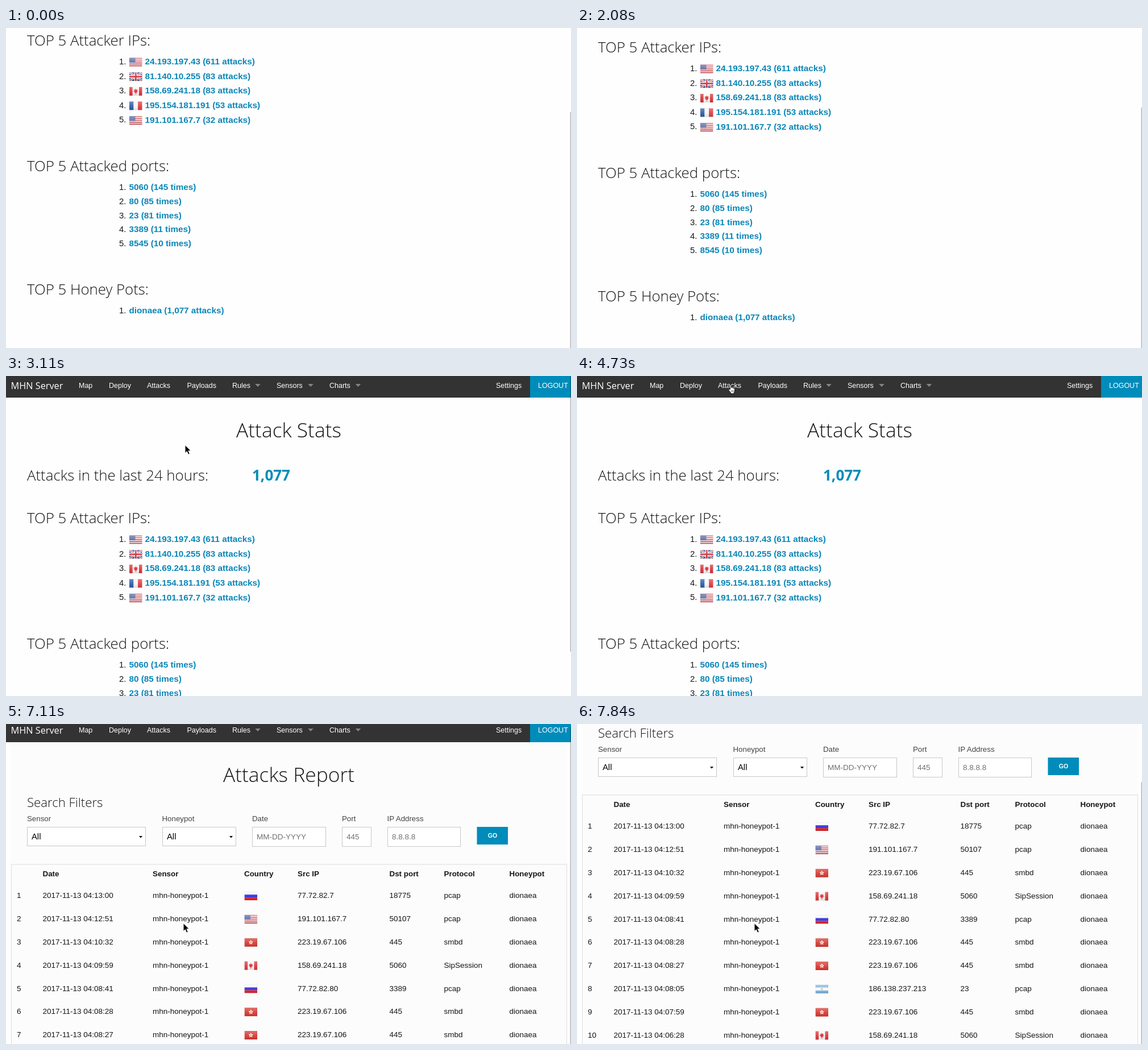
These frames come from a looping animation (994x563 px, 7.99 s). An HTML page:

```html
<!DOCTYPE html>
<html lang="en">
<head>
<meta charset="utf-8">
<title>Attack dashboard</title>
<style>
  html, body { margin: 0; width: 100%; height: 100%; overflow: hidden; background: #fefefe; }
  svg { display: block; }
  #stage { width: 994px; height: 563px; }
  text { font-family: "Liberation Sans", Arial, sans-serif; fill: #161616; white-space: pre; }
  .head { font-family: "Open Sans", sans-serif; font-weight: 300; }
  .brand { font-family: "Open Sans", sans-serif; fill: #fff; }
  .total { font-family: "Open Sans", sans-serif; font-weight: 700; fill: #008cba; }
  .link { font-weight: 700; fill: #0a86b8; }
  .bold { font-weight: 700; }
  .nav { fill: #fff; }
  .label { fill: #444; }
  .hint { fill: #707070; }
  .value { fill: #000; }
  .field { fill: #fff; stroke: #c8c8c8; }
</style>
</head>
<body>
<svg id="stage" viewBox="0 0 994 563">
  <defs>
    <linearGradient id="gloss" x2="0" y2="1">
      <stop offset="0" stop-color="#fff" stop-opacity=".3"/>
      <stop offset=".55" stop-color="#fff" stop-opacity=".08"/>
      <stop offset="1" stop-color="#000" stop-opacity=".1"/>
    </linearGradient>
  </defs>
  <g id="stats"></g>
  <g id="report"></g>
  <rect id="thumb" x="992.6" width="1.4" fill="#000" fill-opacity=".3"/>
  <g id="arrow">
    <path d="M0 0V14.2L3.3 11.2L5.7 16.7L8.3 15.6L5.9 10.2H10.3Z" fill="#000" stroke="#fff" stroke-width="1" stroke-linejoin="round"/>
  </g>
  <g id="hand">
    <path d="M3.2 9V1.6Q3.3 .4 4.3 .5Q5.3 .5 5.4 1.7V5.5Q6.6 4.6 7.5 5.9Q8.8 5.2 9.6 6.5Q11.4 6.1 11.5 8V11Q11.4 13 10.2 14.2V16H4.4V14.4L.8 10Q.1 8.6 1.1 8.2Q2.2 7.8 3.2 9Z" fill="#fff" stroke="#111" stroke-width="1" stroke-linejoin="round"/>
    <path d="M5.7 10V13M7.5 10V13M9.3 10V13" stroke="#333" stroke-width=".7"/>
  </g>
</svg>
<script>
const $ = id => document.getElementById(id);

// Text is placed by its left edge and the middle of its capitals.
const text = (x, mid, size, cls, str, anchor = "start") =>
  `<text x="${x}" y="${mid + size * (cls === "head" ? 0.36 : 0.33)}" font-size="${size}" class="${cls}" text-anchor="${anchor}">${str}</text>`;
const rect = (x, y, w, h, fill) => `<rect x="${x}" y="${y}" width="${w}" height="${h}" fill="${fill}"/>`;
const field = (x, w, h) => `<rect class="field" x="${x + 0.5}" y="187.5" width="${w - 1}" height="${h - 1}"/>`;
const wedge = (x, y, half, h, fill) => `<path d="M${x - half} ${y}h${2 * half}l${-half} ${h}z" fill="${fill}"/>`;
const range = n => [...Array(n).keys()];

function star(cx, cy, points, outer, inner, fill) {
  const pts = range(points * 2).map(i => {
    const a = Math.PI * (i / points - 0.5), r = i % 2 ? inner : outer;
    return `${(cx + r * Math.cos(a)).toFixed(2)},${(cy + r * Math.sin(a)).toFixed(2)}`;
  });
  return `<polygon points="${pts.join(" ")}" fill="${fill}"/>`;
}

const bands = (...colors) => colors.map((c, i) => rect(0, i * 16 / colors.length, 24, 16 / colors.length, c)).join("");
const columns = (...colors) => colors.map((c, i) => rect(i * 8, 0, 8, 16, c)).join("");
const line = (d, color, width) => `<path d="${d}" stroke="${color}" stroke-width="${width}"/>`;

const flags = {
  us: bands(...range(9).map(i => i % 2 ? "#f6e9ea" : "#c9434c")) + rect(0, 0, 11, 8.9, "#4a5c9c") +
    range(12).map(i => rect(1.2 + (i % 4) * 2.5, 1.3 + (i >> 2) * 2.6, 0.9, 0.9, "#d5daec")).join(""),
  gb: rect(0, 0, 24, 16, "#2f4a8f") + line("M0 0L24 16M24 0L0 16", "#fff", 3.4) +
    line("M0 0L24 16M24 0L0 16", "#cc3340", 1.2) + line("M12 0V16M0 8H24", "#fff", 5.4) +
    line("M12 0V16M0 8H24", "#cc2f3b", 3),
  ca: rect(0, 0, 24, 16, "#fafafa") + rect(0, 0, 6, 16, "#d8343a") + rect(18, 0, 6, 16, "#d8343a") +
    star(12, 7.6, 7, 5, 2.4, "#d8242c") + rect(11.6, 10, 0.8, 4, "#d8242c"),
  fr: columns("#2b5ba5", "#f5f5f5", "#dc3c40"),
  ru: bands("#fafafa", "#2a2ae0", "#dd1f26"),
  hk: rect(0, 0, 24, 16, "#d5382f") + star(12, 8, 5, 4.8, 2.4, "#fbe9e6") + `<circle cx="12" cy="8" r="1" fill="#d5382f"/>`,
  ar: bands("#7fb5e2", "#f8f8f8", "#7fb5e2") + `<circle cx="12" cy="8" r="1.8" fill="#dfb866"/>`
};
const flag = (name, x, mid) =>
  `<svg x="${x}" y="${mid - 7.6}" width="22.6" height="15.2" viewBox="0 0 24 16" preserveAspectRatio="none">${flags[name]}
   <rect width="24" height="16" fill="url(#gloss)"/><rect x=".25" y=".25" width="23.5" height="15.5" fill="none" stroke="#000" stroke-opacity=".12" stroke-width=".5"/></svg>`;

function navBar() {
  const items = [[128, "Map"], [181, "Deploy"], [248, "Attacks"], [318.5, "Payloads"], [398, "Rules", 443],
    [476, "Sensors", 536], [569, "Charts", 619.5], [862, "Settings"], [936, "LOGOUT"]];
  return rect(0, 0, 994, 38, "#333") + rect(922, 0, 72, 38, "#008cba") +
    text(8.5, 17.5, 16.3, "brand", "MHN Server") +
    items.map(([x, label, caret]) =>
      text(x, 16.8, 12.5, "nav", label) + (caret ? wedge(caret, 14, 4.8, 5, "#858585") : "")).join("");
}

const title = str => text(497.5, 95, 35.4, "head", str, "middle");
const heading = (mid, str) => text(37, mid, 25.8, "head", str);

function list(top, gap, items) {
  return items.map(([label, country], i) => {
    const mid = top + i * gap;
    return text(199, mid, 14.8, "", `${i + 1}.`) + (country ? flag(country, 217, mid + 1) : "") +
      text(country ? 244.5 : 216.5, mid, 15.25, "link", label);
  }).join("");
}

$("stats").innerHTML = navBar() + title("Attack Stats") +
  heading(175, "Attacks in the last 24 hours:") + text(433, 175.8, 26, "total", "1,077") +
  heading(250, "TOP 5 Attacker IPs:") +
  list(287, 25.65, [["24.193.197.43 (611 attacks)", "us"], ["81.140.10.255 (83 attacks)", "gb"],
    ["158.69.241.18 (83 attacks)", "ca"], ["195.154.181.191 (53 attacks)", "fr"], ["191.101.167.7 (32 attacks)", "us"]]) +
  heading(471, "TOP 5 Attacked ports:") +
  list(508.3, 24.7, [["5060 (145 times)"], ["80 (85 times)"], ["23 (81 times)"], ["3389 (11 times)"], ["8545 (10 times)"]]) +
  heading(688, "TOP 5 Honey Pots:") + list(725, 0, [["dionaea (1,077 attacks)"]]) +
  heading(805.5, "TOP 5 Sensors:") + list(843, 0, [["mhn-honeypot-1 (1,077 attacks)"]]) +
  heading(923, "TOP 5 Attacks Signatures:");

function filters() {
  const labels = [[37, "Sensor"], [274.5, "Honeypot"], [433, "Date"], [591, "Port"], [670.5, "IP Address"]];
  const select = (x, w) => field(x, w, 34) + text(x + 8, 204.5, 14.8, "value", "All") + wedge(x + w - 9, 203, 3, 3.4, "#000");
  const input = (x, w, hint) => field(x, w, 35) + text(x + 8, 205, 13.5, "hint", hint);
  return text(37, 144, 22.2, "head", "Search Filters") +
    labels.map(([x, str]) => text(x, 173, 13.3, "label", str)).join("") +
    select(37, 209) + select(275, 130) +
    input(433, 130, "MM-DD-YYYY") + input(591, 52, "445") + input(671, 129, "8.8.8.8") +
    rect(828.5, 187, 54.5, 31, "#008cba") + text(856, 202.5, 10.6, "nav bold", "GO", "middle");
}

function table() {
  const cols = [19, 64.5, 258, 419, 513, 674.5, 770.5, 885.5];
  const names = ["", "Date", "Sensor", "Country", "Src IP", "Dst port", "Protocol", "Honeypot"];
  const rows = [
    ["13:00", "ru", "77.72.82.7", "18775", "pcap"],
    ["12:51", "us", "191.101.167.7", "50107", "pcap"],
    ["10:32", "hk", "223.19.67.106", "445", "smbd"],
    ["09:59", "ca", "158.69.241.18", "5060", "SipSession"],
    ["08:41", "ru", "77.72.82.80", "3389", "pcap"],
    ["08:28", "hk", "223.19.67.106", "445", "smbd"],
    ["08:27", "hk", "223.19.67.106", "445", "smbd"],
    ["08:05", "ar", "186.138.237.213", "23", "pcap"],
    ["07:59", "hk", "223.19.67.106", "445", "smbd"],
    ["06:28", "ca", "158.69.241.18", "5060", "SipSession"]
  ];
  const body = rows.map(([time, country, ip, port, protocol], i) => {
    const mid = 307.8 + i * 40.82;
    const cells = [i + 1, `2017-11-13 04:${time}`, "mhn-honeypot-1", "", ip, port, protocol, "dionaea"];
    return cells.map((cell, c) => text(cols[c], mid, 13.5, "", cell)).join("") + flag(country, 419.5, mid + 0.8);
  }).join("");
  return `<rect x="9.5" y="253" width="977" height="800" fill="none" stroke="#ddd"/>` +
    names.map((name, c) => text(cols[c], 269.8, 13.4, "bold", name)).join("") + body;
}

$("report").innerHTML = rect(9, 38, 978, 1000, "#fcfcfc") + navBar() + title("Attacks Report") + filters() + table();

const LOOP = 7990, REPORT_AT = 6070;

// [time, scroll offset]
const scrollSteps = [[0, 228], [150, 232], [300, 234], [600, 262], [750, 338], [890, 396],
  [1780, 378], [1930, 308], [2080, 216], [2230, 140], [2380, 86], [2520, 46], [2670, 20], [2820, 6], [2970, 0],
  [7110, 6], [7260, 24], [7410, 48], [7560, 78], [7700, 105], [7840, 128]];

// [time, shape, x, y]
const cursorSteps = [[0, ""], [3110, "arrow", 315, 121.5], [3260, "arrow", 311, 110], [3410, "arrow", 300, 85],
  [3550, "arrow", 286, 57], [3700, "arrow", 273, 36], [3850, "arrow", 264, 24], [3990, "arrow", 260, 18],
  [4140, "arrow", 259, 16], [4580, "hand", 264, 14], [4730, "hand", 266, 15],
  [6520, "arrow", 297, 215], [6670, "arrow", 312, 350.5]];

// [time, scrollbar opacity]
const thumbSteps = [[0, 1], [3410, 0.6], [3550, 0.25], [3700, 0], [7110, 1]];

const at = (steps, t) => steps.findLast(step => step[0] <= t);

function draw(now) {
  const t = now % LOOP, onReport = t >= REPORT_AT;
  const scroll = at(scrollSteps, t)[1];
  const [, shape, x, y] = at(cursorSteps, t);
  for (const id of ["stats", "report"]) {
    $(id).style.display = (id === "report") === onReport ? "" : "none";
    $(id).setAttribute("transform", `translate(0 ${-scroll})`);
  }
  for (const id of ["arrow", "hand"]) {
    $(id).style.display = id === shape ? "" : "none";
    if (id === shape) $(id).setAttribute("transform", `translate(${x} ${y})`);
  }
  const thumb = $("thumb");
  thumb.setAttribute("y", onReport ? scroll * 0.8 : scroll * 0.667 - 4);
  thumb.setAttribute("height", onReport ? 586 : 489);
  thumb.setAttribute("opacity", at(thumbSteps, t)[1]);
}

const start = performance.now();
function tick() {
  draw(performance.now() - start);
  requestAnimationFrame(tick);
}
tick();
</script>
</body>
</html>
```
